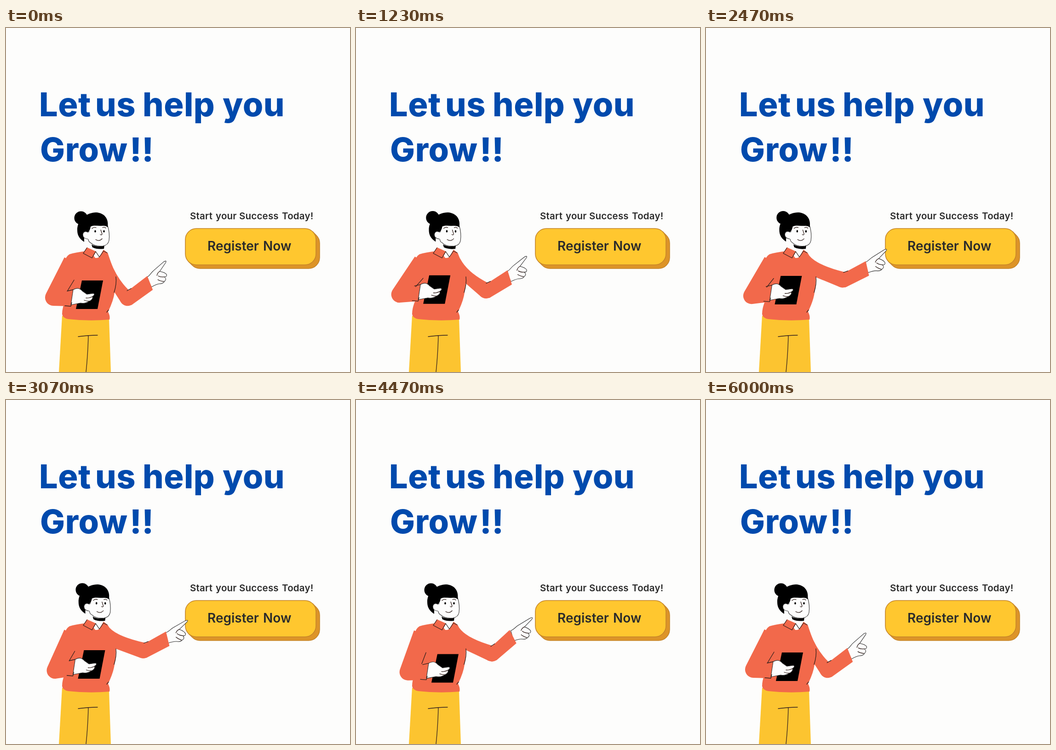
Write an HTML page that moves like this. It is 748x748 px and loops after 6030 ms.

```html
<!DOCTYPE html>
<html lang="en">
<head>
<meta charset="utf-8">
<title>Register Now</title>
<style>
  html, body { margin: 0; width: 100%; height: 100%; overflow: hidden; background: #fdfdfc; }
  svg { display: block; width: 100%; height: 100%; }
  text { font-family: Inter, "Open Sans", sans-serif; font-weight: 600; fill: #2b2b2b; }
  .headline { font-size: 72px; font-weight: 800; letter-spacing: .5px; fill: #004aad; }
  .note { font-size: 20.5px; letter-spacing: .2px; }
  .label { font-size: 28px; }
  .coral { fill: #f2694b; }
  .sleeve { fill: none; stroke: #f2694b; stroke-width: 36; stroke-linejoin: round; }
  .skin { fill: #fdfdfd; stroke: #333; stroke-width: 1.1; stroke-linejoin: round; }
  .line { fill: none; stroke: #32211d; stroke-width: 1.3; stroke-linecap: round; stroke-linejoin: round; }
  .edge { stroke: #c5852a; stroke-width: 1.6; }
</style>
</head>
<body>
<svg viewBox="0 0 748 748">
  <text class="headline" y="192"><tspan x="72">Let</tspan> <tspan x="194">us</tspan> <tspan x="297">help</tspan> <tspan x="471">you</tspan></text>
  <text class="headline" y="290"><tspan x="74">Grow</tspan><tspan x="269">!!</tspan></text>

  <text class="note" y="416"><tspan x="400">Start</tspan> <tspan x="456">your</tspan> <tspan x="507">Success</tspan> <tspan x="600">Today!</tspan></text>
  <path class="edge" fill="#dd9428" d="M667 443L675 451A24 24 0 0 1 682 468V499A24 24 0 0 1 658 523H422A24 24 0 0 1 405 516L397 508Z"/>
  <rect class="edge" x="390" y="436" width="284" height="79" rx="24" fill="#ffc72f"/>
  <text class="label" y="484"><tspan x="438">Register</tspan> <tspan x="559">Now</tspan></text>

  <!-- trousers and torso -->
  <path fill="#fcc430" d="M122 626L115 748H228L224 631Z"/>
  <path class="line" d="M157 671Q180 668 199 668M179 670Q178 710 174 748"/>
  <path class="coral" d="M176 485Q150 488 138 492Q128 498 128 512L130 590Q122 608 122 622Q123 631 136 633Q180 638 225 634Q227 627 222 617Q234 592 236 575Q240 550 238 538L221 489L212 484Z"/>
  <path class="line" d="M219 618L223 613"/>

  <!-- pointing arm -->
  <path class="coral" id="upperArm"/>
  <g id="hand">
    <path class="skin" d="M306 542C313 538 315 532 320 528L343 508Q350 504 347 510L334 529Q346 531 349 536Q350 541 344 541Q350 546 345 550Q342 556 333 556Q326 557 316 563Z"/>
    <path class="line" d="M334 529Q329 532 328 538M344 541Q336 542 331 539M343 551Q335 550 330 547"/>
  </g>
  <g id="foreArm">
    <circle class="coral" cx="264" cy="587" r="17"/>
    <path class="coral" d="M264 572L307 539L319 569L273 602L262 604Z"/>
    <path class="line" d="M263 571L272 566"/>
  </g>
  <path class="line" d="M239 541Q241 556 235 575"/>

  <!-- neck, head and collar -->
  <path fill="#fdfdfd" d="M186 462H212V486L204 500H194L184 486Z"/>
  <g id="head">
    <path d="M186 471Q200 478 214 472L213 480Q198 482 188 477Z"/>
    <path class="skin" d="M182 428L221 430Q226 446 224 462Q222 472 211 474Q193 476 184 467Q176 464 180 445Z"/>
    <circle cx="163" cy="413" r="14.5"/>
    <path d="M155 440C154 417 176 401 196 401C214 402 224 415 221 433Q216 429 210 430C198 431 191 428 184 432Q183 440 178 444L170 451L170 465Q155 456 155 440Z"/>
    <path class="skin" d="M180 445Q169 439 167 449Q167 458 178 459"/>
    <path fill="#fdfdfd" d="M179 444H184V461L177 458Z"/>
    <ellipse cx="194" cy="442" rx="1.8" ry="2.6"/>
    <ellipse cx="213" cy="442" rx="1.8" ry="2.6"/>
    <path class="line" d="M187 436Q191 432 196 434M210 434Q214 432 217 435M206 439L209 448Q208 451 205 449M195 460Q203 465 209 458"/>
  </g>
  <path class="coral" d="M176 477L168 489L188 500L196 486ZM212 482L220 488L209 501H196L203 498Z"/>
  <path class="line" d="M176 478L168 490L187 500L195 486L203 498L212 485L220 489"/>

  <!-- arm with the tablet -->
  <path class="sleeve" id="sleeve"/>
  <path class="line" id="fold"/>
  <g id="tablet">
    <path d="M165 549H211L199 611H152Z"/>
    <path class="skin" d="M146 569Q158 562 166 572L176 579L190 577Q195 579 188 584Q190 590 181 594Q172 600 162 598L141 602Z"/>
    <path class="line" d="M188 584Q180 588 174 587M181 594Q175 594 170 592M133 572L146 569M128 604L141 605L143 597"/>
  </g>
</svg>
<script>
const LOOP = 6030;
const times = [0, 730, 1270, 1770, 3070, 3870, 4930, 5600, LOOP];

// Poses at those times: angles in degrees, offsets in pixels.
const poses = {
  upper:  [57.4, 52.6, 40, 28, 20.3, 20.3, 32.9, 54, 57.4],
  fore:   [0, .4, 5, 9.6, 8.3, -2, -5.9, -1, 0],
  wrist:  [0, .5, 3, 5.4, 11.2, 12, 6.5, 1, 0],
  head:   [0, 1, 4, 6, 3, 0, 0, 0, 0],
  elbowX: [0, -2.5, -8.5, -9, 3.5, 15, 4, -.5, 0],
  elbowY: [0, -2, -7, -8, 2, 8, 3, 0, 0],
  tabX:   [0, -1, -6, -7, 4.5, 17.5, 6, .5, 0],
  tabY:   [0, -2, -11.5, -13, -5, 4.5, 2, 0, 0]
};

// Smooth interpolation that never overshoots a pose.
function track(values) {
  const rise = i => (values[i + 1] - values[i]) / (times[i + 1] - times[i]);
  const slopes = values.map((_, i) => {
    if (i === 0 || i === values.length - 1) return 0;
    const a = rise(i - 1), b = rise(i);
    return a * b > 0 ? 2 * a * b / (a + b) : 0;
  });
  return t => {
    let i = 0;
    while (i < times.length - 2 && t >= times[i + 1]) i++;
    const span = times[i + 1] - times[i], u = (t - times[i]) / span, v = 1 - u;
    return values[i] * (1 + 2 * u) * v * v + slopes[i] * span * u * v * v
      + values[i + 1] * u * u * (3 - 2 * u) - slopes[i + 1] * span * u * u * v;
  };
}

const tracks = Object.entries(poses).map(([name, values]) => [name, track(values)]);
const set = (id, name, value) => document.getElementById(id).setAttribute(name, value);
const rad = degrees => degrees * Math.PI / 180;
const turn = (x, y, degrees) => {
  const c = Math.cos(rad(degrees)), s = Math.sin(rad(degrees));
  return [x * c - y * s, x * s + y * c];
};
const add = (a, b) => [a[0] + b[0], a[1] + b[1]];
const place = (to, angle, pivot) =>
  `translate(${to}) rotate(${angle}) translate(${pivot.map(v => -v)})`;

function draw(t) {
  const p = Object.fromEntries(tracks.map(([name, at]) => [name, at(t)]));

  const shoulder = [218, 515];
  const elbow = add(shoulder, turn(85.7, 0, p.upper));
  const inner = add(elbow, turn(3, -17, p.fore));
  const cuff = add(elbow, turn(49, -33, p.fore));
  const bend = [232 + (p.upper - 20) * .1, 512 + (p.upper - 20) * .75];
  const under = turn(0, 17, p.upper);
  set("upperArm", "d", `M200 492L221 489Q${bend} ${inner}L${elbow}L${add(elbow, under)}L${add(shoulder, under)}Z`);
  set("foreArm", "transform", place(elbow, p.fore, [264, 587]));
  set("hand", "transform", place(cuff, p.wrist, [313, 554]));

  set("head", "transform", `translate(${p.head * .8} 0) rotate(${p.head / 6} 200 480)`);

  const shift = [p.tabX, p.tabY];
  set("sleeve", "d", `M143 507L${103 + p.elbowX} ${586 + p.elbowY}L${add([142, 587], shift)}`);
  set("fold", "d", `M${148 + p.tabX * .35} ${548 + p.tabY * .35}L${134 + p.tabX * .75} ${571 + p.tabY * .75}`);
  set("tablet", "transform", `translate(${shift})`);
}

const start = performance.now();
function tick() {
  draw((performance.now() - start) % LOOP);
  requestAnimationFrame(tick);
}
tick();
</script>
</body>
</html>
```
